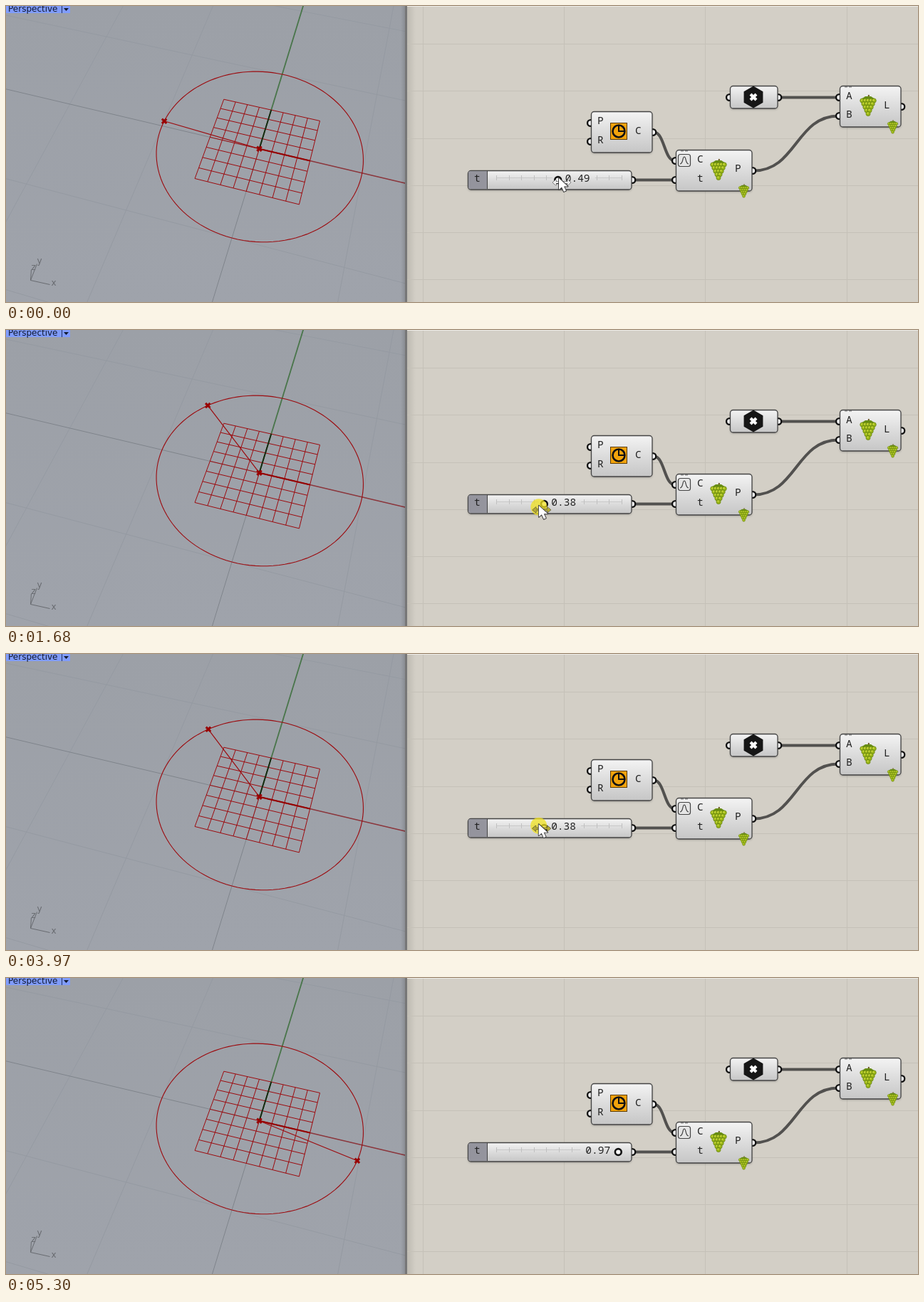
An HTML page with a canvas that plays this animation: 1280x416 px, repeating every 5400 ms.

```html
<!DOCTYPE html>
<html lang="en">
<head>
<meta charset="utf-8">
<title>Point on a circle driven by a slider</title>
<style>
html, body { margin: 0; width: 100%; height: 100%; overflow: hidden; }
canvas { display: block; width: 1280px; height: 416px; }
</style>
</head>
<body>
<canvas id="stage" width="1280" height="416"></canvas>
<script>
const c = document.getElementById('stage').getContext('2d');
const LOOP = 5400, DRAG_START = 430, DRAG_END = 5300;
const RADIUS = 2, TAU = Math.PI * 2;
const MONO = '14.5px "Noto Sans Mono", monospace';
const SANS = '12px "DejaVu Sans", sans-serif';

// Turning points of the pointer; u is the slider position and may overshoot 0..1
const stops = [
  { t: 0, u: .54, y: 242 },
  { t: 150, u: .49, y: 244 },
  { t: DRAG_START, u: .49, y: 244 },
  { t: 1200, u: 1.13, y: 248, power: 1.6 },
  { t: 2340, u: -.14, y: 246, power: .61 },
  { t: 2470, u: -.14, y: 246 },
  { t: 3230, u: 1.12, y: 254, power: .9 },
  { t: 3330, u: 1.12, y: 254 },
  { t: 4440, u: -.03, y: 231, power: .8 },
  { t: 4510, u: -.03, y: 231 },
  { t: LOOP, u: 1.15, y: 244, power: 1.4 }
];

function pointerAt(t) {
  const i = stops.findIndex(s => s.t > t);
  const a = stops[i - 1], b = stops[i];
  const f = ((t - a.t) / (b.t - a.t)) ** (b.power || 1);
  return { u: a.u + (b.u - a.u) * f, y: a.y + (b.y - a.y) * f };
}

// Perspective view of the ground plane
function project(X, Y) {
  const w = 1 - .0138 * X + .0448 * Y;
  return [(355 + 65.25 * X + 33.4 * Y) / w, (200.2 + 13.8 * X - 48.07 * Y) / w];
}

function trace(points, close) {
  c.beginPath();
  points.forEach(p => c.lineTo(...p));
  if (close) c.closePath();
}

function stroke(points, color, width = 1, close = false) {
  trace(points, close);
  c.strokeStyle = color;
  c.lineWidth = width;
  c.stroke();
}

function fillPoly(points, color) {
  trace(points, true);
  c.fillStyle = color;
  c.fill();
}

function rect(x, y, w, h, color) {
  c.fillStyle = color;
  c.fillRect(x, y, w, h);
}

function disc(x, y, r, fill, line, width = 2) {
  c.beginPath();
  c.arc(x, y, r, 0, TAU);
  if (fill) { c.fillStyle = fill; c.fill(); }
  if (line) { c.strokeStyle = line; c.lineWidth = width; c.stroke(); }
}

function text(s, x, y, font = MONO, color = '#222') {
  c.font = font;
  c.fillStyle = color;
  c.fillText(s, x, y);
}

function cross(x, y, r, color, width) {
  stroke([[x - r, y - r], [x + r, y + r]], color, width);
  stroke([[x - r, y + r], [x + r, y - r]], color, width);
}

function fade(x0, y0, x1, y1, ...colors) {
  const g = c.createLinearGradient(x0, y0, x1, y1);
  colors.forEach((color, i) => g.addColorStop(i / (colors.length - 1), color));
  return g;
}

const ground = (a, b, color, width) => stroke([project(...a), project(...b)], color, width);
const onCircle = v => project(RADIUS * Math.cos(v * TAU), RADIUS * Math.sin(v * TAU));

function drawView(value) {
  rect(0, 0, 560, 416, fade(0, 0, 0, 416, '#9ca0a7', '#9fa3ab'));
  c.save();
  c.translate(.5, .5);

  for (const k of [-4, -2, 2, 4]) {
    ground([k, -6], [k, 6], '#959aa2');
    ground([-7, k], [6, k], '#959aa2');
  }
  ground([-7, 0], [0, 0], '#7f848b');
  ground([0, -6], [0, 0], '#7f848b');
  ground([0, 0], [0, 6], '#49754a', 1.8);
  ground([0, 0], [6, 0], '#8b363c', 1.6);

  const red = '#9c0a0e';
  for (let i = -4; i <= 4; i++) {
    ground([i / 4, -1], [i / 4, 1], red);
    ground([-1, i / 4], [1, i / 4], red);
  }
  ground([0, 0], [0, 1], '#102a10', 1.8);
  ground([0, 0], [1, 0], '#960000', 2);
  stroke(Array.from({ length: 120 }, (_, i) => onCircle(i / 120)), red, 1.1, true);

  const end = onCircle(value), origin = project(0, 0);
  stroke([origin, end], red, 1.2);
  for (const p of [origin, end]) cross(...p, 3.2, '#990000', 3);

  const grey = '#686b70';
  stroke([[35, 370], [34, 385], [61, 391]], grey);
  stroke([[34, 385], [43, 362]], grey);
  text('x', 63, 392, SANS, grey);
  text('y', 43, 361, SANS, grey);
  text('z', 35, 370, SANS, grey);
  c.restore();

  rect(0, 0, 90, 10, '#809cfb');
  rect(78, 0, 1, 10, '#26355f');
  text('Perspective', 3, 8, SANS, '#111a30');
  fillPoly([[81, 3], [88, 3], [84.5, 7]], '#111a30');
}

function wire(x0, y0, x1, y1) {
  const m = (x0 + x1) / 2;
  c.beginPath();
  c.moveTo(x0, y0);
  c.bezierCurveTo(m, y0, m, y1, x1, y1);
  c.strokeStyle = '#52514f';
  c.lineWidth = 4;
  c.stroke();
}

// A component with the heights of its input and output ports
function box(x, y, w, h, inputs, outputs) {
  for (const py of inputs) disc(x - .5, py + .5, 4.4, '#fff', '#111', 2.4);
  for (const py of outputs) disc(x + w + .8, py + .5, 4.4, '#fff', '#111', 2.4);
  c.save();
  c.shadowColor = 'rgba(0,0,0,.25)';
  c.shadowBlur = 3;
  c.shadowOffsetY = 1.5;
  c.beginPath();
  c.roundRect(x + .5, y + .5, w - .5, h - .5, 4);
  c.fillStyle = fade(0, y, 0, y + h, '#f4f4f4', '#dcdcdc', '#c6c6c6');
  c.fill();
  c.restore();
  c.strokeStyle = '#444';
  c.lineWidth = 1.3;
  c.stroke();
}

function grapes(x, y, s) {
  c.save();
  c.translate(x, y);
  c.scale(s, s);
  stroke([[0, -9], [1, -15]], '#6b5a22', 2);
  fillPoly([[-10, -9], [-4, -13], [4, -13], [10, -9], [6, -2], [-6, -2]], '#678d14');
  for (let row = 0; row < 5; row++) {
    for (let i = row; i < 5; i++) {
      const gx = (i - 2 - row / 2) * 4.1, gy = row * 4.6 - 7;
      disc(gx, gy, 3.1, '#98b418', '#648010', .7);
      disc(gx - .6, gy - .8, 1.2, '#c6d636');
    }
  }
  c.restore();
}

function cluster(x, y, w, h, inputs, outputs, iconX) {
  box(x, y, w, h, inputs, outputs);
  grapes(iconX, y + 28, 1);
  grapes(x + w - 11.5, y + h, .64);
  for (const dx of [7, 13]) rect(x + dx, y + 1, 4, 1.5, '#888');
}

function drawSlider(value) {
  box(648, 231, 230, 27, [], [244]);
  c.beginPath();
  c.roundRect(649, 232, 26, 25, [3, 0, 0, 3]);
  c.fillStyle = '#94949d';
  c.fill();
  rect(675, 232, 1, 25, '#444');
  text('t', 657, 247);

  const hx = 688.5 + 176 * value, right = value <= .5;
  const gap = right ? [hx - 8, hx + 52] : [hx - 53, hx + 8];
  c.save();
  c.beginPath();
  c.rect(680, 232, gap[0] - 680, 24);
  c.rect(gap[1], 232, 872 - gap[1], 24);
  c.clip();
  rect(688, 241, 177, 1, '#c8c8c8');
  for (let i = 0; i <= 10; i++) rect(Math.round(688 + i * 17.6), 238, 1, 7, '#c0c0c0');
  c.restore();
  text(value.toFixed(2), right ? hx + 10 : hx - 46, 247);
  disc(hx, 244.5, 4.4, '#fff', '#111', 2.6);
}

function drawGraph(value) {
  rect(554, 0, 6, 416, fade(554, 0, 560, 0, 'rgba(0,0,0,0)', 'rgba(0,0,0,.12)'));
  rect(560, 0, 3, 416, '#777');
  rect(563, 0, 717, 416, '#d3cfc6');
  rect(563, 0, 12, 416, fade(563, 0, 575, 0, 'rgba(0,0,0,.1)', 'rgba(0,0,0,0)'));
  rect(563, 0, 717, 1, '#eeece8');
  for (let x = 585; x < 1280; x += 198.2) rect(Math.round(x), 1, 1, 415, '#c5c1b8');
  for (let y = 53.2; y < 416; y += 66.2) rect(563, Math.round(y), 717, 1, '#c5c1b8');

  c.save();
  c.translate(.5, .5);
  wire(1085, 128, 1168, 128);
  wire(1049, 231, 1168, 154);
  wire(909, 177, 938, 217);
  wire(880, 244, 938, 244);
  c.restore();

  box(1016, 112, 67, 32, [128], [128]);
  fillPoly(Array.from({ length: 6 }, (_, i) =>
    [1049 + 15.5 * Math.sin(i * TAU / 6), 128 + 15.5 * Math.cos(i * TAU / 6)]), '#161616');
  cross(1049, 128, 4, '#fff', 4);

  cluster(1170, 112, 86, 58, [128, 154], [141], 1210);
  text('A', 1179, 131);
  text('B', 1179, 157);
  text('L', 1232, 144);

  box(821, 148, 86, 58, [164, 190], [177]);
  text('P', 830, 166);
  text('R', 830, 193);
  text('C', 883, 180);
  rect(848, 164, 24, 24, '#5c3b00');
  rect(849, 165, 22, 22, '#f2a30c');
  disc(860, 176, 8.5, null, '#111', 2.6);
  stroke([[860, 168], [860, 176], [868, 176]], '#111', 2);

  cluster(940, 202, 107, 58, [217, 244], [231], 1000);
  text('C', 970, 220);
  text('t', 970, 247);
  text('P', 1023, 233);
  c.beginPath();
  c.roundRect(943.5, 208.5, 17, 17, 3);
  c.fillStyle = '#e6e6e6';
  c.fill();
  c.strokeStyle = '#444';
  c.lineWidth = 1.2;
  c.stroke();
  c.stroke(new Path2D('M946 222C951 221 949 212 952 212S953 221 958 222'));

  drawSlider(value);
}

const resize = new Path2D('M-9 6l5-4v3h16v-3l5 4-5 4v-3h-16v3z');
const arrow = new Path2D('M0 0v16l4-3.5 3 6.5 3-1.4-3-6.1h5.5z');

function outlined(shape, fill, width) {
  c.strokeStyle = '#333';
  c.lineWidth = width;
  c.stroke(shape);
  c.fillStyle = fill;
  c.fill(shape);
}

function drawPointer(x, y, pressed) {
  if (pressed) disc(x, y + 2, 11.5, 'rgba(240,226,32,.75)');
  c.save();
  c.translate(x, y);
  c.lineJoin = 'round';
  outlined(resize, pressed ? '#b5aa34' : '#eee', 1);
  outlined(arrow, '#fff', 1.8);
  c.restore();
}

function frame(now) {
  const t = now % LOOP;
  const { u, y } = pointerAt(t);
  const dragging = t >= DRAG_START;
  const value = dragging ? Math.min(1, Math.max(0, u)) : .49;
  drawView(value);
  drawGraph(value);
  if (t < DRAG_END) drawPointer(681 + 176 * u, y, dragging);
  requestAnimationFrame(frame);
}
requestAnimationFrame(frame);
</script>
</body>
</html>
```
